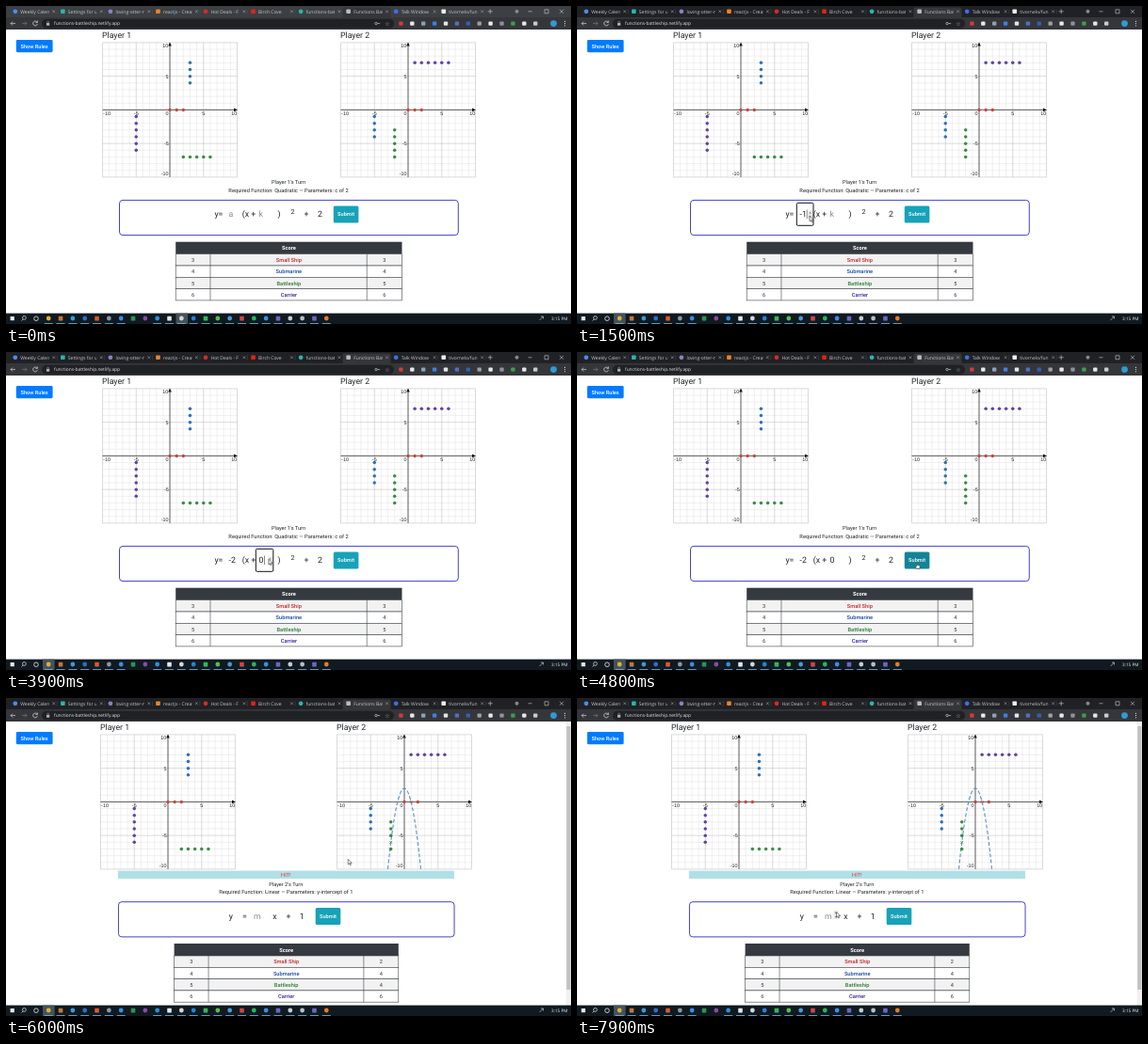
An HTML page that plays this animation: 600 by 338 pixels, repeating every 8 s.

```html
<!DOCTYPE html>
<html lang="en">
<head>
<meta charset="utf-8">
<title>Functions game</title>
<style>
html, body { margin: 0; width: 100%; height: 100%; overflow: hidden; background: #fff; }
svg { display: block; width: 100vw; height: 100vh; }
text { font-family: Roboto, sans-serif; text-rendering: geometricPrecision; white-space: pre; }
.ui text { font-family: "Open Sans", "Noto Sans", sans-serif; }
.plot text { font-family: "Liberation Sans", Arial, sans-serif; }
</style>
</head>
<body>
<svg id="stage" viewBox="0 0 600 338" preserveAspectRatio="none"></svg>
<script>
const LOOP = 8000, FOCUS = 1300, SUBMIT = 4900;
const RED = '#c74440', BLUE = '#2d70b3', GREEN = '#388c46', PURPLE = '#6042a6';

const rect = (x, y, w, h, fill, more = '') =>
  `<rect x="${x}" y="${y}" width="${w}" height="${h}" fill="${fill}" ${more}/>`;
const circle = (x, y, r, fill, more = '') => `<circle cx="${x}" cy="${y}" r="${r}" fill="${fill}" ${more}/>`;
const path = (d, stroke, width = 0.6, more = 'fill="none"') =>
  `<path d="${d}" stroke="${stroke}" stroke-width="${width}" ${more}/>`;
const text = (x, y, size, str, fill = '#212529', more = '') =>
  `<text x="${x}" y="${y}" font-size="${size}" fill="${fill}" ${more}>${str}</text>`;
const mid = (x, y, size, str, fill, more = '') => text(x, y, size, str, fill, 'text-anchor="middle" ' + more);
const MEDIUM = 'font-weight="500"';

// Browser frame
const tabs = [
  ['Weekly Calen', '#4a8df0'], ['Settings for u', '#2bb5ae'], ['loving-otter-n', '#8d7fc7'],
  ['reactjs - Creat', '#e8842c'], ['Hot Deals - F', '#d42a2a'], ['Birch Cove', '#e62117'],
  ['functions-batt', '#2bb5ae'], ['Functions Bat', '#b9bcc0'], ['Talk Window', '#3f6fe0'],
  ['tivornelo/fun', '#eeeeee']
];

function browser() {
  let s = rect(0, 0, 600, 13, '#202124', 'id="strip"') + rect(0, 12, 600, 13, '#35363a');
  s += rect(357.5, 1.5, 51, 12, '#35363a', 'rx="2"');
  tabs.forEach(([name, color], i) => {
    const x = 9.8 + 50.55 * i;
    s += i % 2 ? rect(x - 2.3, 3.5, 4.6, 4.6, color, 'rx=".8"') : circle(x, 5.8, 2.4, color);
    s += `<svg x="${x + 5}" y="0" width="31" height="13">${text(0.5, 7.7, 5, name, '#c6c9cc')}</svg>`;
    s += path(`M${x + 39.5} 4.4l2.8 2.8m0-2.8l-2.8 2.8`, '#b4b7ba', 0.5);
    if (i !== 6 && i !== 7) s += path(`M${x + 44.5} 3.5v5`, '#55575b', 0.4);
  });
  s += path('M511.7 5.8h5m-2.5-2.5v5M554.5 5.8h4m13.5-2h4v4h-4zM588 3.8l4 4m0-4l-4 4', '#d0d2d5', 0.6);
  s += circle(542.5, 5.8, 2, '#85888c');
  s += path('M10 18.6H5m2-2l-2 2l2 2', '#d8dadd', 0.7) + path('M17 18.6h5m-2-2l2 2l-2 2', '#777a7e', 0.7);
  s += path('M33 17.1a2.4 2.4 0 1 0 .4 2M33.4 15.6v2h-2', '#d8dadd', 0.7);
  s += rect(38, 13.8, 374, 9.8, '#202124', 'rx="4.9"');
  s += rect(43, 18.1, 3.2, 2.6, '#b5b8bc') + path('M43.7 18.1v-1a.9.9 0 0 1 1.8 0v1', '#b5b8bc', 0.5);
  s += text(51, 20.3, 4.85, 'functions-battleship.netlify.app', '#e4e6e9');
  s += circle(393, 18.6, 1.2, 'none', 'stroke="#c4c7ca" stroke-width=".7"') + path('M394.2 18.6h3', '#c4c7ca', 0.7);
  s += mid(405, 20.9, 6, '☆', '#c4c7ca');
  ['#d23b3b', '#e8e8e8', '#8aa0b8', '#3f7fe0', '#e0e4e8', '#4f6fc0', '#2f5fb8', '#9aa0a6',
   '#e8e8e8', '#8d9196', '#3f9c4c', '#e4e6e8', '#c8cbd0'].forEach((c, i) =>
    s += rect(417.2 + 11.9 * i, 16.4, 4.4, 4.4, c, 'rx="1"'));
  s += circle(581.5, 18.6, 3.4, '#2f9bd3');
  return s + [16.4, 18.6, 20.8].map(y => circle(593.5, y, 0.6, '#d8dadd')).join('');
}

function taskbar() {
  let s = rect(0, 326.6, 600, 11.4, '#101a20') + rect(4.6, 330, 4.2, 4.2, '#e8ecef');
  s += circle(19.4, 331.4, 1.9, 'none', 'stroke="#e8ecef" stroke-width=".7"') + path('M18 333l-1.5 1.5', '#e8ecef', 0.7);
  return s + circle(32, 332.2, 2.3, 'none', 'stroke="#e8ecef" stroke-width=".8"');
}

function apps() {
  let s = '';
  ['#d9b23a', '#c8743c', '#3a9bd8', '#2e6fc4', '#d85a32', '#8a98a3', '#3c8ee6', '#2a9458', '#8a4aa8',
   '#2d8fe0', '#e5e7e9', '#d5d8da', '#2783d4', '#35b75a', '#58bd4e', '#4b9ad6', '#d44444', '#2ab65c',
   '#3c8ee6', '#6c66c4', '#c9ced2', '#b9c0c5', '#6c66c4', '#e87a2a'].forEach((c, i) => {
    const x = 45.2 + 12.83 * i;
    s += i % 3 === 1 ? rect(x - 2.3, 329.8, 4.6, 4.6, c, 'rx=".6"') : circle(x, 332, 2.4, c);
    if (i !== 7 && i !== 8) s += rect(x - 4.5, 337.2, 9, 0.8, '#76b9ed');
  });
  s += path('M566.5 334l4-4m-2.5 0h2.5v2.5', '#dfe3e6', 0.6);
  return s + text(579, 333.8, 4.7, '3:15 PM', '#f2f4f5');
}

// Plots
const U = 7.15, CY = 110.4;
const run = (x, y, dx, dy, n, color) => ({ x, y, dx, dy, n, color });
const fleet1 = [run(0, 0, 1, 0, 3, RED), run(3, 4, 0, 1, 4, BLUE), run(-5, -1, 0, -1, 6, PURPLE), run(2, -7, 1, 0, 5, GREEN)];
const fleet2 = [run(0, 0, 1, 0, 3, RED), run(-5, -1, 0, -1, 4, BLUE), run(1, 7, 1, 0, 6, PURPLE), run(-2, -3, 0, -1, 5, GREEN)];

function plot(cx, fleet, shot) {
  const px = x => cx + x * U, py = y => CY - y * U, E = 10 * U;
  let minor = '', major = '';
  for (let i = -10; i <= 10; i++) {
    const d = `M${px(i)} ${CY - E}v${2 * E}M${cx - E} ${py(i)}h${2 * E}`;
    if (i % 5) minor += d; else if (i) major += d;
  }
  let s = path(minor, '#dedede', 0.45) + path(major, '#b4b4b4', 0.5);
  s += path(`M${cx} ${CY - E + 1}v${2 * E - 1}M${cx - E} ${CY}h${2 * E - 1}`, '#222', 0.75);
  s += `<path d="M${cx} ${CY - E - 0.5}l1.8 4h-3.6zM${cx + E + 0.5} ${CY}l-4 1.8v-3.6z" fill="#111"/>`;
  const label = (x, y, v) => text(x, y, 5.4, v, '#222', 'text-anchor="end"');
  s += label(cx - 63.1, 116.3, -10) + label(px(-5) + 2.4, 116.3, -5) + label(cx - 1.5, 116.3, 0)
    + label(px(5) + 1.5, 116.3, 5) + label(cx + 71.3, 116.3, 10);
  s += label(cx - 1.7, 44, 10) + label(cx - 1.5, 76.5, 5) + label(cx - 1.3, 148, -5) + label(cx - 1.5, 180, -10);
  if (shot) { // y = -2x² + 2
    const r = Math.sqrt(6);
    s += path(`M${px(-r)} ${py(-10)}Q${cx} ${py(14)} ${px(r)} ${py(-10)}`, '#5c8fc4', 1.1, 'fill="none" stroke-dasharray="4 2.2"');
  }
  for (const f of fleet) for (let i = 0; i < f.n; i++) {
    const x = f.x + i * f.dx, y = f.y + i * f.dy;
    const hit = shot && -2 * x * x + 2 === y;
    s += hit ? path(`M${px(x) - 1.4} ${py(y) - 1.4}l2.8 2.8m0-2.8l-2.8 2.8`, f.color, 0.8)
             : circle(px(x), py(y), 1.75, f.color);
  }
  return `<g class="plot">${s}</g>`;
}

// Page
function scoreTable(x, y, w, mine, theirs) {
  const a = x + w * 0.153, b = x + w * 0.845, h = 12.3, mx = x + w / 2;
  let s = rect(x, y, w, 13, '#343a40') + mid(mx, y + 8.5, 5.7, 'Score', '#fff', 'font-weight="700"');
  [['Small Ship', '#c62a2a'], ['Submarine', '#164a9e'], ['Battleship', '#2a7d34'], ['Carrier', '#3d249c']].forEach(([name, color], i) => {
    const ry = y + 13 + h * i, ty = ry + 8.2;
    s += rect(x, ry, w, h, i % 2 ? '#fff' : '#f2f2f2', 'stroke="#3e444a" stroke-width=".6"');
    s += mid((x + a) / 2, ty, 5.6, mine[i], '#333') + mid(mx, ty, 5.7, name, color, MEDIUM) + mid((b + x + w) / 2, ty, 5.6, theirs[i], '#333');
  });
  return s + path(`M${a} ${y + 13}v${4 * h}M${b} ${y + 13}v${4 * h}`, '#3e444a', 0.6);
}

const EQ = 8.75, GRAY = '#858a8f';
const submit = (x, y, fill) => rect(x, y, 26.6, 18, fill, 'rx="1.5"') + mid(x + 13.3, y + 10.9, 5.65, 'Submit', '#fff', MEDIUM);

function page(W, c1, c2, shot, dy, turn, rule, scores) {
  const m = W / 2;
  let s = rect(0, 25, 600, 302, '#fff');
  s += rect(10.8, 36, 38.8, 13.2, '#007bff', 'rx="1.4"') + mid(30.2, 44.6, 5.6, 'Show Rules', '#fff', MEDIUM);
  s += text(c1 - 72, 33.6, EQ, 'Player 1') + text(c2 - 72, 33.6, EQ, 'Player 2');
  s += plot(c1, fleet1) + plot(c2, fleet2, shot);
  s += mid(m, 189.4 + dy, 5.6, turn) + mid(m, 197.8 + dy, 5.72, rule);
  s += rect(W * 0.2 + 0.5, 206.4 + dy, W * 0.6 - 0.2, 37.2, '#fff', 'rx="3.5" stroke="#4441cf" stroke-width="1"');
  return s + scoreTable(W * 0.3 + 0.2, 250.7 + dy, W * 0.4 + 0.3, [3, 4, 5, 6], scores);
}

const before = page(600, 174, 427, false, 0, "Player 1's Turn",
    'Required Function: Quadratic — Parameters: c of 2', [3, 4, 5, 6])
  + text(221.4, 224.3, EQ, 'y=') + text(250.8, 224.3, EQ, '(x +') + text(288.6, 224.3, EQ, ')')
  + text(302.6, 221.3, 7, '2') + text(316.4, 224.3, EQ, '+') + text(331, 224.3, EQ, '2');

const after = page(594.7, 172, 423, true, 10.3, "Player 2's Turn",
    'Required Function: Linear — Parameters: y-intercept of 1', [2, 4, 4, 6])
  + rect(119, 183.6, 357, 8.4, '#b0e0e6') + mid(297.3, 189.8, 5.7, 'HIT!', '#d9363e')
  + text(236.8, 234.7, EQ, 'y') + text(251, 234.7, EQ, '=') + text(263, 234.7, EQ, 'm', GRAY)
  + text(283.3, 234.7, EQ, 'x') + text(297.4, 234.7, EQ, '+') + text(311.8, 234.7, EQ, '1') + submit(328.7, 223, '#17a2b8')
  + rect(594.7, 25, 5.3, 302, '#f1f1f1') + rect(595.3, 30, 4.1, 280, '#c1c1c1');

const spinner = (x, y) => rect(x - 2.4, y - 4.6, 4.8, 9.2, '#e8e8e8')
  + `<path d="M${x - 1.2} ${y - 1.6}h2.4l-1.2-1.7zM${x - 1.2} ${y + 1.6}h2.4l-1.2 1.7z" fill="#777"/>`;

function field(x, w, hint, value, focus, hover, t) {
  let s = focus ? rect(x, 209.3, w, 24, '#fff', 'rx="1.3" stroke="#111" stroke-width="1"') : '';
  s += text(x + 3.2, 224.3, EQ, value || hint, value ? '#212529' : GRAY);
  if (focus && (t - focus) % 1000 < 600) s += path(`M${x + (value.length > 1 ? 10.9 : 9.2)} 216.5v9.5`, '#111', 0.5);
  return focus || hover ? s + spinner(x + w - 3.4, 222) : s;
}

// Pointer: [time, x, y]
const track = [[100, 188, 331], [800, 241, 231], [900, 241, 231], [1150, 247, 223.3], [2350, 247, 223.3],
  [3050, 279, 219], [3450, 279, 219], [3600, 279, 222], [4000, 279, 220], [4600, 361, 224.3],
  [5200, 361, 224.3], [5900, 363.2, 171.3], [6100, 363.2, 171.3], [6900, 275.5, 227.5]];

function pointerAt(t) {
  const i = track.findIndex(k => k[0] > t);
  if (i < 0) return track[track.length - 1].slice(1);
  if (!i) return track[0].slice(1);
  const [a, b] = [track[i - 1], track[i]];
  const p = (t - a[0]) / (b[0] - a[0]), e = p * p * (3 - 2 * p);
  return [a[1] + (b[1] - a[1]) * e, a[2] + (b[2] - a[2]) * e];
}

const shapes = {
  arrow: 'M0 0v5.6l1.3-1.2l.9 2l.9-.4l-.9-1.9h1.8z',
  hand: 'M-.5 0q.5-.6 1 0v2.2l2.4.6q.5.2.4.8l-.5 2.4h-3l-1.8-2.4q.3-.7 1.5.1z'
};

function pointer([x, y], kind) {
  const ink = kind === 'beam'
    ? path('M-1.3-2.8q1.3 0 1.3.6q0-.6 1.3-.6M0-2.2v4.4M-1.3 2.8q1.3 0 1.3-.6q0 .6 1.3.6', '#111', 0.6)
    : path(shapes[kind], '#111', 0.5, 'fill="#fff"');
  return `<g transform="translate(${x} ${y})">${ink}</g>`;
}

const stage = document.getElementById('stage');
stage.innerHTML = `<g id="before">${before}</g><g id="after">${after}</g><g class="ui">${browser()}${taskbar()}</g>
  <g id="focus"></g><g class="ui">${apps()}</g><g id="live"></g>`;
const [gBefore, gAfter, gFocus, gLive, strip] =
  ['before', 'after', 'focus', 'live', 'strip'].map(id => document.getElementById(id));

function draw(t) {
  const done = t >= SUBMIT, active = t >= FOCUS, pos = pointerAt(t), [x, y] = pos;
  const over = (l, r, top, bottom) => x > l && x < r && y > top && y < bottom;
  gBefore.style.display = done ? 'none' : '';
  gAfter.style.display = done ? '' : 'none';
  strip.setAttribute('fill', active ? '#202124' : '#3c4043');
  gFocus.innerHTML = rect(active ? 39 : 180.5, 326.6, 12.6, 11.4, '#46525a');

  let s = '', kind = 'arrow';
  if (done) {
    if (over(260, 279, 219, 244)) s = spinner(275, 230.5);
  } else {
    const inA = over(233, 251, 209, 233.5), inK = over(265, 284, 209, 233.5), inButton = over(348, 375, 212, 231);
    const a = !active ? '' : t < 1700 ? '-1' : '-2';
    const k = t < 3300 ? '' : t < 3700 ? '1' : '0';
    s = field(233.3, 17.7, 'a', a, active && t < 3300 && (t < 1700 ? FOCUS : 1700), inA, t)
      + field(265.3, 18.5, 'k', k, t >= 3300 && t < 4700 && (t < 3700 ? 3300 : 3700), inK, t)
      + submit(347.8, 212.4, inButton ? '#138496' : '#17a2b8');
    if (inButton) kind = 'hand';
    else if (inA && x < 244 || inK && x < 276) kind = 'beam';
  }
  gLive.innerHTML = s + (t > 100 ? pointer(pos, kind) : '');
}

const start = performance.now();
function tick() {
  draw((performance.now() - start) % LOOP);
  requestAnimationFrame(tick);
}
tick();
</script>
</body>
</html>
```
